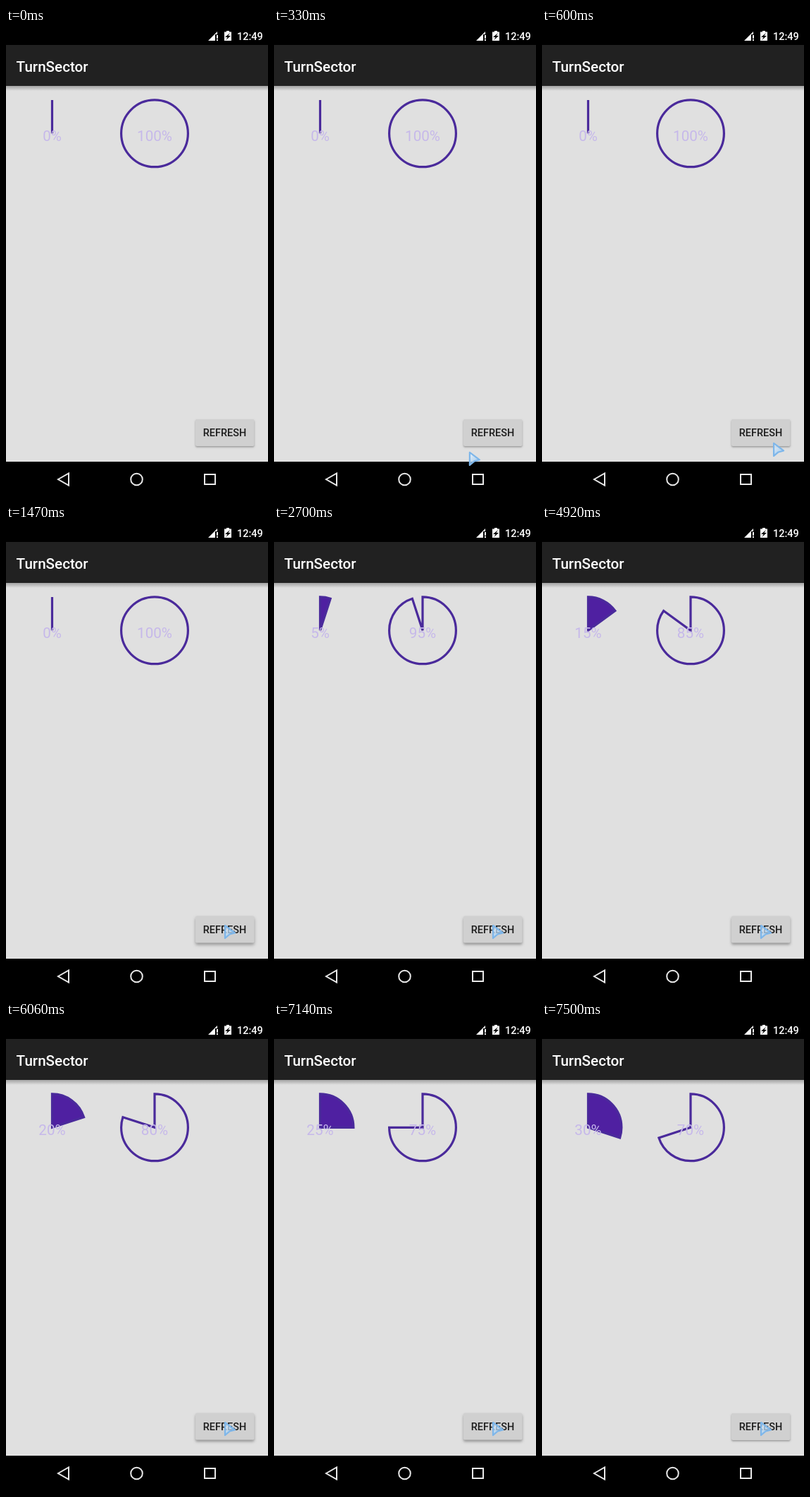
Recreate the animation shown at these times as an HTML page with a canvas. Size 372 by 664 pixels, loop 8 s.

```html
<!DOCTYPE html>
<html lang="en">
<head>
<meta charset="utf-8">
<title>Sector dials</title>
<style>
html, body { margin: 0; height: 100%; overflow: hidden; background: #000; }
canvas { display: block; }
</style>
</head>
<body>
<canvas id="stage" width="372" height="664"></canvas>
<script>
const ctx = document.getElementById('stage').getContext('2d');
const LOOP = 8000, SETTLE = 105, STEP = 5;
// Button presses: [finger down, settled again]; the value advances on release.
const presses = [[1380, 1650], [2700, 2940], [3840, 4050], [4920, 5160], [6060, 6420], [7140, 7500]];

const progress = (t, from, to) => Math.max(0, Math.min(1, (t - from) / (to - from)));
const smooth = v => v * v * (3 - 2 * v);
const bezier = (s, a, b, c, d) =>
  a * (1 - s) ** 3 + 3 * b * s * (1 - s) ** 2 + 3 * c * s * s * (1 - s) + d * s ** 3;

function rect(x, y, w, h, color) {
  ctx.fillStyle = color;
  ctx.fillRect(x, y, w, h);
}

function poly(points, fill, stroke, width) {
  ctx.beginPath();
  points.forEach(([x, y]) => ctx.lineTo(x, y));
  ctx.closePath();
  if (fill) { ctx.fillStyle = fill; ctx.fill(); }
  if (stroke) { ctx.strokeStyle = stroke; ctx.lineWidth = width; ctx.stroke(); }
}

function text(str, x, y, size, weight, color, align = 'left') {
  ctx.font = `${weight} ${size}px Roboto, sans-serif`;
  ctx.textAlign = align;
  ctx.fillStyle = color;
  ctx.fillText(str, x, y);
}

function statusBar() {
  rect(0, 0, 372, 24, '#000');
  poly([[287, 18], [300, 5], [300, 9], [297, 9], [297, 18]], '#fff');
  rect(299, 10, 2, 5, '#fff');
  rect(299, 16, 2, 2, '#fff');
  rect(310, 5.5, 10, 12.5, '#fff');
  rect(313, 4, 4, 2, '#fff');
  poly([[318, 7], [311, 13], [314.5, 13], [312.5, 17], [319, 11], [315.5, 11]], '#000');
  text('12:49', 328, 17, 14.5, 500, '#fff');
}

function actionBar() {
  const shade = ctx.createLinearGradient(0, 82, 0, 89);
  shade.addColorStop(0, 'rgba(0,0,0,.28)');
  shade.addColorStop(0.5, 'rgba(0,0,0,.14)');
  shade.addColorStop(1, 'rgba(0,0,0,0)');
  rect(0, 82, 372, 7, shade);
  rect(0, 24, 372, 58, '#212121');
  text('TurnSector', 14.5, 61.5, 20.67, 500, '#fff');
}

function navBar() {
  rect(0, 614, 372, 50, '#000');
  poly([[74, 639], [89, 630.5], [89, 647.5]], null, '#e8e8e8', 2);
  ctx.beginPath();
  ctx.arc(185.5, 639, 8.3, 0, 2 * Math.PI);
  ctx.stroke();
  ctx.strokeRect(282, 632, 15, 14);
}

function dial(cx, percent, filled) {
  const cy = 149.3, top = -Math.PI / 2;
  ctx.beginPath();
  if (percent < 100) ctx.moveTo(cx, cy);
  ctx.arc(cx, cy, 47.4, top, top + percent / 50 * Math.PI);
  ctx.closePath();
  ctx.miterLimit = 4;
  ctx.lineWidth = 3.2;
  ctx.strokeStyle = '#4a2a9b';
  if (filled) { ctx.fillStyle = '#4f20a1'; ctx.fill(); }
  ctx.stroke();
  text(percent + '%', cx, 160, 20.67, 400, '#c6b8ea', 'center');
}

function button(lift) {
  ctx.save();
  ctx.shadowColor = 'rgba(0,0,0,.32)';
  ctx.shadowBlur = 2.5 + 2 * lift;
  ctx.shadowOffsetY = 1.5 + 1.5 * lift;
  ctx.fillStyle = '#d0d0d0';
  ctx.beginPath();
  ctx.roundRect(269, 554 - 0.6 * lift, 83.5, 38, 2);
  ctx.fill();
  ctx.restore();
  text('REFRESH', 310.5, 578, 14.47, 500, '#1c1c1c', 'center');
}

// Sweeps in along a curve, then makes a small nudge before the first press.
function pointer(t) {
  if (t < 30) return;
  const s = 1 - (1 - progress(t, 30, 810)) ** 1.75;
  const nudge = progress(t, 1140, 1230);
  ctx.save();
  ctx.translate(bezier(s, 65, 160, 383, 315) - 6 * nudge,
                bezier(s, 382, 620, 637, 568) - 3 * nudge);
  ctx.lineJoin = 'round';
  const shape = [[2, 2], [16, 12.5], [8.5, 14.5], [2, 20]];
  const tint = ctx.createLinearGradient(2, 4, 12, 16);
  tint.addColorStop(0, 'rgba(236,245,253,.75)');
  tint.addColorStop(1, 'rgba(150,200,244,.75)');
  poly(shape, tint, '#7db6ea', 2.2);
  ctx.restore();
}

function draw(t) {
  let value = 0, lift = 0;
  for (const [down, end] of presses) {
    const release = end - SETTLE;
    if (t >= release) value += STEP;
    if (t >= down && t < end) {
      lift = (0.7 + 0.3 * progress(t, down, down + 60)) * (1 - smooth(progress(t, release, end)));
    }
  }
  rect(0, 0, 372, 664, '#e0e0e0');
  actionBar();
  statusBar();
  dial(65.5, value, true);
  dial(211, 100 - value, false);
  button(lift);
  navBar();
  pointer(t);
}

function tick() {
  draw(performance.now() % LOOP);
  requestAnimationFrame(tick);
}
tick();
</script>
</body>
</html>
```
